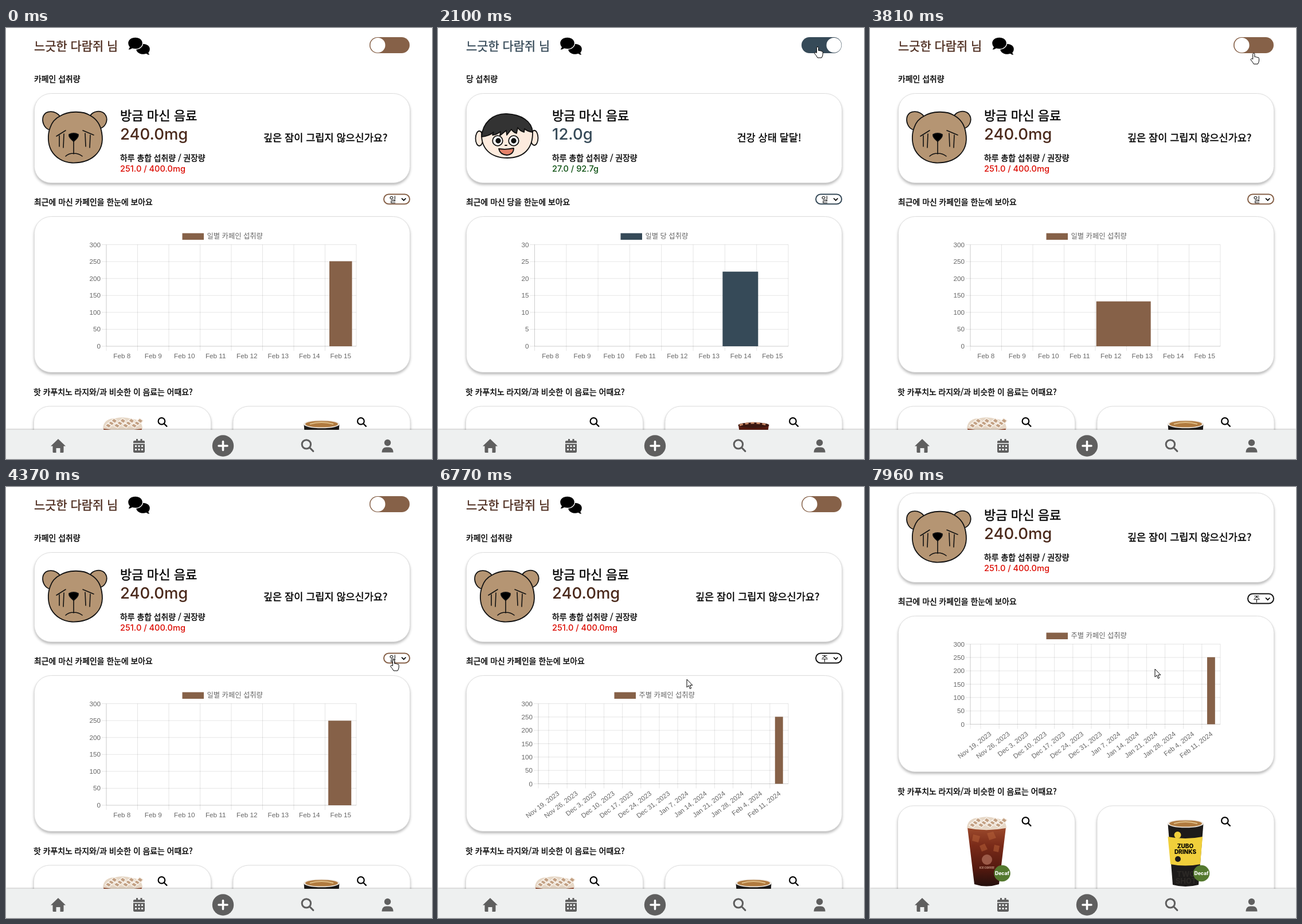
An HTML page that plays this animation: 743x753 px, repeating every 8000 ms.

```html
<!DOCTYPE html>
<html lang="ko">
<head>
<meta charset="utf-8">
<style>
  html, body { margin: 0; width: 100%; height: 100%; overflow: hidden; background: #fff; }
  svg { display: block; width: 743px; height: 753px; color: #866148; --ink: #4b2a1c; }
  svg.sugar { color: #364a58; --ink: #364a58; }
  svg:not(.sugar) .sugar-only, svg.sugar .caffeine-only { display: none; }
  text { font: 13.87px "Noto Sans CJK KR", "Noto Sans CJK", sans-serif; white-space: pre; }
  .ko { stroke: #000; stroke-width: .4px; }
  .num { font: 500 14.6px Inter, sans-serif; }
  .axis text { font: 11.7px "Liberation Sans", sans-serif; fill: #666; }
  .axis text.legend { font: 12.3px "Noto Sans CJK KR", "Noto Sans CJK", sans-serif; }
  .card { fill: #fff; stroke: #ddd; filter: drop-shadow(0 3px 2px rgba(0,0,0,.27)); }
  .line { fill: none; stroke: #111; stroke-width: 1.8; stroke-linecap: round; stroke-linejoin: round; }
  .lens { fill: none; stroke-linecap: round; }
  .latin { font: 800 10px Inter, sans-serif; text-anchor: middle; }
</style>
</head>
<body>
<svg id="stage" viewBox="0 0 743 753">
  <defs>
    <linearGradient id="tea" x2="0" y2="1">
      <stop stop-color="#9c4a2c"/><stop offset=".3" stop-color="#7a2b19"/><stop offset=".7" stop-color="#54190f"/><stop offset="1" stop-color="#24100d"/>
    </linearGradient>
    <g id="lens" class="lens"><circle cx="-1.600" cy="-1.600" r="5.800"/><path d="M2.700 2.700 7.400 7.400"/></g>
    <g id="badge"><circle r="14.3" fill="#54792f"/><text class="latin" y="3" fill="#fff" style="font-size:8.6px">Decaf</text></g>
  </defs>

  <g id="page">
    <text class="ko" x="49" y="39.3" style="font-size:20.9px;fill:var(--ink);stroke:var(--ink)">느긋한 다람쥐 님</text>
    <g stroke="#fff" stroke-width="1.4">
      <path d="M239 27c7 0 12.500 4 12.500 10 0 3-1 5-2.500 6.500l2.500 4q-4 .3-7-2c-9 3-18-2-18-8.500 0-6 5.500-10 12.500-10z"/>
      <path d="M225.500 16c7.500 0 13 4.500 13 10.500s-5.500 10.500-13 10.500q-3 0-5-.8-4 2.600-8 2.300l2.700-5q-2.700-3-2.700-7c0-6 5.500-10.500 13-10.500z"/>
    </g>
    <rect x="634" y="16" width="70" height="28" rx="14" fill="currentColor"/>
    <circle id="knob" cx="648.500" cy="30" r="13" fill="#fff"/>

    <rect class="card" x="49.500" y="114.500" width="655" height="156" rx="29"/>
    <rect class="card" x="49.500" y="329.500" width="655" height="272" rx="29"/>
    <rect class="card" x="48.500" y="661" width="309" height="240" rx="27"/>
    <rect class="card" x="396" y="661" width="309" height="240" rx="27"/>

    <text class="ko" x="199" y="160.700" style="font-size:22.1px">방금 마신 음료</text>
    <text class="ko" x="199" y="231.500">하루 총합 섭취량 / 권장량</text>
    <text class="ko" x="48" y="641">핫 카푸치노 라지와/과 비슷한 이 음료는 어때요?</text>

    <g class="caffeine-only">
      <text class="ko" x="49" y="94.200">카페인 섭취량</text>
      <text class="num" x="199" y="194.500" style="font-size:27.5px;fill:var(--ink)">240.0mg</text>
      <text class="num" x="199" y="251" fill="#dc0a00">251.0 / 400.0mg</text>
      <text class="ko" x="449" y="198" style="font-size:17.5px">깊은 잠이 그립지 않으신가요?</text>
      <text class="ko" x="49" y="309.100">최근에 마신 카페인을 한눈에 보아요</text>
      <g class="line">
        <path fill="#b59573" d="M76 178C66 175 62 163 65 154 70 143 86 144 94 154M147 153C152 145 165 143 172 150 179 158 176 171 164 176"/>
        <path fill="#b59573" d="M94 154C108 145 134 144 147 153 158 159 165 170 167 183 170 200 165 214 155 223 145 232 131 236 115 235.500 99 235 86 226 79 214 73 203 72 187 77 174 80 165 86 158 94 154Z"/>
        <path d="M88 189 104 179M134 179 153 187M93 188V207M101 185 100 209M138 184 139 207M147 187 146 209M118 198V220M104 224Q109 219 118 219T133 224" stroke-width="1.600"/>
        <path fill="#000" d="M110 186Q118 182 126 186 127 191 118 198 109 191 110 186Z"/>
      </g>
      <path d="M169 699Q171 682 190 682 204 678 220 683 237 684 238 699 204 706 169 699Z" fill="#e6d7c6"/>
      <path id="ice" fill="#c2a083" stroke="#f7f0e8" stroke-width="1.500"/>
      <path d="M170 699Q203 706 237 699L225 798Q203 805 182 798Z" fill="url(#tea)"/>
      <path d="M169 699Q203 706 238 699" fill="none" stroke="#ecdccb" stroke-width="1.500"/>
      <path d="M180 711l12 3-3 11-11-3zM204 709l11-3 5 11-12 4zM191 731l9-4 5 10-10 4zM217 729l9 2-2 11-9-2z" fill="#b9643a" opacity=".5"/>
      <circle cx="204" cy="755" r="9" fill="#9c5a48"/>
      <text class="latin" x="204" y="771" fill="#c79a86" style="font-size:4.500px">ICE COFFEE</text>
      <use href="#badge" x="230.500" y="779"/>

      <path d="M519.500 692H581.500L573 799Q550 805 528 799Z" fill="#1d1b1a"/>
      <text class="latin" x="551" y="785" fill="#2c2926" style="font-size:13px">TWO</text>
      <text class="latin" x="551" y="797" fill="#2c2926" style="font-size:13px">SHOT</text>
      <ellipse cx="550.500" cy="692" rx="31.500" ry="7.300" fill="#efe9e2"/>
      <ellipse cx="550.500" cy="692" rx="28.500" ry="5.600" fill="#b07a3f"/>
      <path d="M530 692Q550 686 571 692" fill="none" stroke="#dfbd86" stroke-width="2"/>
      <path d="M519.500 715Q550 721 580 715L576 763Q550 768 524 763Z" fill="#f0cf3b"/>
      <circle cx="536.500" cy="712" r="6" fill="#f0cf3b"/>
      <text class="latin" x="550" y="735">ZUBO</text>
      <text class="latin" x="550" y="745">DRINKS</text>
      <circle cx="537" cy="754" r="5" fill="#1d1b1a"/>
      <use href="#badge" x="578" y="779"/>
    </g>

    <g class="sugar-only">
      <text class="ko" x="49" y="94.200">당 섭취량</text>
      <text class="num" x="199" y="194.500" style="font-size:27.5px;fill:var(--ink)">12.0g</text>
      <text class="num" x="199" y="251" fill="#0a4f10">27.0 / 92.7g</text>
      <text class="ko" x="521.500" y="198" style="font-size:17.5px">건강 상태 달달!</text>
      <text class="ko" x="49" y="309.100">최근에 마신 당을 한눈에 보아요</text>
      <g class="line" stroke-width="1.500">
        <ellipse cx="72" cy="193" rx="6.500" ry="13" fill="#fdebde"/>
        <ellipse cx="168" cy="192" rx="6.500" ry="13" fill="#fdebde"/>
        <path fill="#fdebde" d="M76 184C75 211 92 227 121 227 149 227 166 211 165 181 160 161 83 160 76 184Z"/>
        <path fill="#333" d="M76 190C78 165 96 149 120 150 145 151 164 163 165 182 158 181 154 179 151 176L150 182Q143 180 139 174L137 184Q131 182 128 177L120 187 119 179 108 188 109 181Q101 187 95 187L97 182Q89 189 76 190Z"/>
        <circle cx="104" cy="197" r="8.800" fill="#fff"/><circle cx="132" cy="197" r="8.800" fill="#fff"/>
        <circle cx="105" cy="197" r="3.800" fill="#111"/><circle cx="132" cy="197" r="3.800" fill="#111"/>
        <path fill="#e5826a" d="M106 211Q119 213 132 210 132 221 120 222 108 221 106 211Z"/>
        <path d="M117 205h3"/>
      </g>
      <path d="M524 694H577L573 720H528Z" fill="#5b1d12"/>
      <ellipse cx="550.500" cy="694" rx="27" ry="5" fill="#3b1710"/>
      <path d="M526 694Q550 686 575 694" fill="none" stroke="#c98a68" stroke-width="3" stroke-dasharray="6 4"/>
    </g>
    <use href="#lens" x="273" y="688.500" stroke="#000" stroke-width="2.200"/>
    <use href="#lens" x="620.500" y="688.500" stroke="#000" stroke-width="2.200"/>

    <g id="charts"></g>

    <rect id="select" x="659" y="290.500" width="45" height="17" rx="8.500" fill="#fff" stroke="currentColor" stroke-width="2"/>
    <text id="period" x="668.500" y="303.500" style="font-size:13px">일</text>
    <path d="M690 297.500l3.700 3.700 3.700-3.700" fill="none" stroke="#000" stroke-width="1.700"/>
    <g id="menu">
      <rect x="659.500" y="308.500" width="45" height="36" fill="#fff" stroke="#777" style="filter:drop-shadow(0 3px 3px rgba(0,0,0,.4))"/>
      <rect id="hover" x="660" width="44" height="18" fill="#1967d2"/>
      <text id="day" x="677" y="321.500" style="font-size:13px">일</text>
      <text id="week" x="677" y="339.500" style="font-size:13px">주</text>
    </g>
  </g>

  <rect y="702" width="743" height="51" fill="#eef0f0" style="filter:drop-shadow(0 -1px 1.500px rgba(0,0,0,.25))"/>
  <g fill="#5f5f5f">
    <path d="M91 718 104 730.500H100.500V740.500Q100.500 742 99 742H94.500V734H87.500V742H83Q81.500 742 81.500 740.500V730.500H78Z"/>
    <path d="M224 721h3v-3h3v3h4.500v-3h3v3h3q1.500 0 1.500 1.500v2.500h-20v-2.500q0-1.500 2-1.500zM222 726.500h20v13q0 2.500-2.500 2.500h-15q-2.500 0-2.500-2.500z"/>
    <path d="M225 730.500h14M225 736.500h14" stroke="#eef0f0" stroke-width="3" stroke-dasharray="3 2.500"/>
    <circle cx="378.500" cy="730" r="18.700"/>
    <path d="M378.500 722.500v15M371 730h15" stroke="#fff" stroke-width="3.600" stroke-linecap="round"/>
    <use href="#lens" transform="translate(526 729.500) scale(1.330)" stroke="#5f5f5f" stroke-width="2.300"/>
    <circle cx="665.500" cy="724.500" r="5.700"/>
    <path d="M655.500 741.500c0-6 3.500-9 7.500-9h5c4 0 7.500 3 7.500 9z"/>
  </g>

  <circle id="halo" r="12" fill="#f0e614" opacity=".56"/>
  <g id="cursor" fill="#fff" stroke="#000" stroke-linejoin="round">
    <path id="arrow" d="M0 0V14L3.200 11 5.500 16.500 7.700 15.500 5.400 10.300H9.800Z"/>
    <path id="hand" d="M-1.600 10.500V1.500Q-1.600 0 0 0T1.600 1.500V6.500Q3 5.500 4.200 7 5.700 6.200 6.700 7.700 9 7 9.200 9.500V13Q9 16 7 19H0Q-2 15-5 12-5.500 10-4 9.500-2.500 9.500-1.600 10.500Z"/>
  </g>
</svg>

<script>
const $ = id => document.getElementById(id);
const range = n => [...Array(n).keys()];
const LOOP = 8000, TOP = 378.5, RIGHT = 611;
const TO_SUGAR = 1600, TO_CAFFEINE = 3460, OPEN_MENU = 5050, PICK_WEEK = 5790;

const days = range(8).map(i => `Feb ${8 + i}`);
const weeks = range(13).map(i => new Date(2023, 10, 19 + 7 * i)
  .toLocaleDateString('en-US', { month: 'short', day: 'numeric', year: 'numeric' }));

const charts = [
  { id: 'caffeine', title: '일별 카페인 섭취량', legend: 307.5, color: '#866148', left: 175, first: 175, bottom: 556, max: 300, value: 251, width: 39.5, labels: days },
  { id: 'sugar', title: '일별 당 섭취량', legend: 318.5, color: '#364a58', left: 168.5, first: 168.5, bottom: 556, max: 30, value: 27, width: 40, labels: days },
  { id: 'weekly', title: '주별 카페인 섭취량', legend: 307.5, color: '#866148', left: 175, first: 193, bottom: 518.5, max: 300, value: 251, width: 13.8, labels: weeks, tilted: true },
];

function chartMarkup(c) {
  const step = (RIGHT - c.first) / c.labels.length;
  const row = (c.bottom - TOP) / 6;
  let grid = `M${c.left} ${TOP}V${c.bottom + 8}`, text = '';
  range(7).forEach(i => {
    const y = c.bottom - i * row;
    grid += `M${c.left - 8} ${y}H${RIGHT}`;
    text += `<text x="${c.left - 10}" y="${y + 4}" text-anchor="end">${c.max / 6 * i}</text>`;
  });
  c.labels.forEach((label, i) => {
    const x = c.first + step * (i + .5);
    if (i || c.tilted) grid += `M${c.first + step * i} ${TOP}V${c.bottom + 8}`;
    text += c.tilted
      ? `<text transform="translate(${x + 1} 534) rotate(-37)" y="4" text-anchor="end">${label}</text>`
      : `<text x="${x}" y="577" text-anchor="middle">${label}</text>`;
  });
  grid += `M${RIGHT} ${TOP}V${c.bottom}`;
  return `<g id="${c.id}" class="axis">
    <path d="${grid}" fill="none" stroke="#000" stroke-opacity=".1"/>
    <path d="M${c.left} ${TOP}V${c.bottom}H${RIGHT}" fill="none" stroke="#000" stroke-opacity=".1"/>
    <rect x="${c.legend}" y="358.500" width="37.500" height="11.500" fill="${c.color}"/>
    <text class="legend" x="${c.legend + 43}" y="367.500">${c.title}</text>
    <rect id="${c.id}-bar" fill="${c.color}"/>${text}</g>`;
}
$('charts').innerHTML = charts.map(chartMarkup).join('');
$('ice').setAttribute('d', range(12).map(i => `M${173 + i * 5} ${695 - (i % 3) * 4}l5-5 6 4-4 5z`).join(''));

const clamp = x => Math.min(1, Math.max(0, x));
const smooth = x => x * x * (3 - 2 * x);
const mix = (a, b, p) => a + (b - a) * p;
const show = (id, on) => $(id).style.display = on ? '' : 'none';
const set = (id, attrs) => Object.entries(attrs).forEach(([k, v]) => $(id).setAttribute(k, v));

// The bar grows out of a wide first slot into its own slot, easing out.
function drawBar(c, progress) {
  const p = 1 - (1 - clamp(progress)) ** 4, span = RIGHT - c.left;
  const slot = (RIGHT - c.first) / c.labels.length;
  const x = mix(c.left + span / 4, RIGHT - slot / 2, p);
  const width = mix(span * .36, c.width, p);
  const height = c.value / c.max * (c.bottom - TOP) * p;
  set(c.id + '-bar', { x: x - width / 2, width, y: c.bottom - height, height });
}

// time, x, y
const path = [
  [260, 702, 699], [560, 662, 260], [800, 636, 14], [1010, 662, 33], [2450, 662, 33], [2660, 668, 28],
  [2930, 668, 28], [3130, 669, 32], [3750, 669, 32], [4230, 676, 302], [5120, 676, 302], [5320, 678, 331],
  [5520, 678, 331], [5590, 679, 333], [6100, 679, 333], [6560, 480, 342], [6770, 434, 336],
  [6910, 434, 336], [7350, 621, 269], [7680, 497, 318], [LOOP, 497, 318],
];
function pointer(t) {
  const i = Math.max(1, path.findIndex(k => k[0] >= t));
  const [a, b] = [path[i - 1], path[i]];
  const p = smooth(clamp((t - a[0]) / (b[0] - a[0])));
  return [mix(a[1], b[1], p), mix(a[2], b[2], p)];
}

function draw(t) {
  const sugar = t >= TO_SUGAR + 100 && t < TO_CAFFEINE + 100;
  const weekly = t >= PICK_WEEK + 130;
  $('stage').classList.toggle('sugar', sugar);
  const slide = smooth(clamp((t - TO_SUGAR - 60) / 300)) - smooth(clamp((t - TO_CAFFEINE - 60) / 300));
  set('knob', { cx: mix(648.5, 690.5, slide) });

  const current = weekly ? 'weekly' : sugar ? 'sugar' : 'caffeine';
  const start = weekly ? PICK_WEEK + 140 : sugar ? TO_SUGAR + 156 : t > TO_CAFFEINE ? TO_CAFFEINE + 180 : -1000;
  charts.forEach(c => {
    show(c.id, c.id === current);
    if (c.id === current) drawBar(c, (t - start) / 1000);
  });

  const [x, y] = pointer(t);
  const onToggle = x > 634 && x < 704 && y > 15 && y < 44;
  const onSelect = t < OPEN_MENU + 70 && x > 659 && y > 290 && y < 308;
  const hand = onToggle || onSelect;
  show('cursor', t >= 260);
  show('hand', hand);
  show('arrow', !hand);
  set('cursor', { transform: `translate(${x} ${y})` });
  show('halo', [TO_SUGAR, TO_CAFFEINE, OPEN_MENU, PICK_WEEK].some(c => t >= c && t < c + 210));
  set('halo', { cx: x - 1, cy: y + 1 });

  const onWeek = y > 326;
  show('menu', t >= OPEN_MENU + 70 && t < PICK_WEEK + 70);
  set('hover', { y: onWeek ? 326 : 309 });
  set('day', { fill: onWeek ? '#000' : '#fff' });
  set('week', { fill: onWeek ? '#fff' : '#000' });
  set('select', { stroke: weekly ? '#111' : 'currentColor' });
  $('period').textContent = weekly ? '주' : '일';

  set('page', { transform: `translate(0 ${-104 * smooth(clamp((t - 7700) / 255))})` });
}

function tick() {
  draw(performance.now() % LOOP);
  requestAnimationFrame(tick);
}
tick();
</script>
</body>
</html>
```
